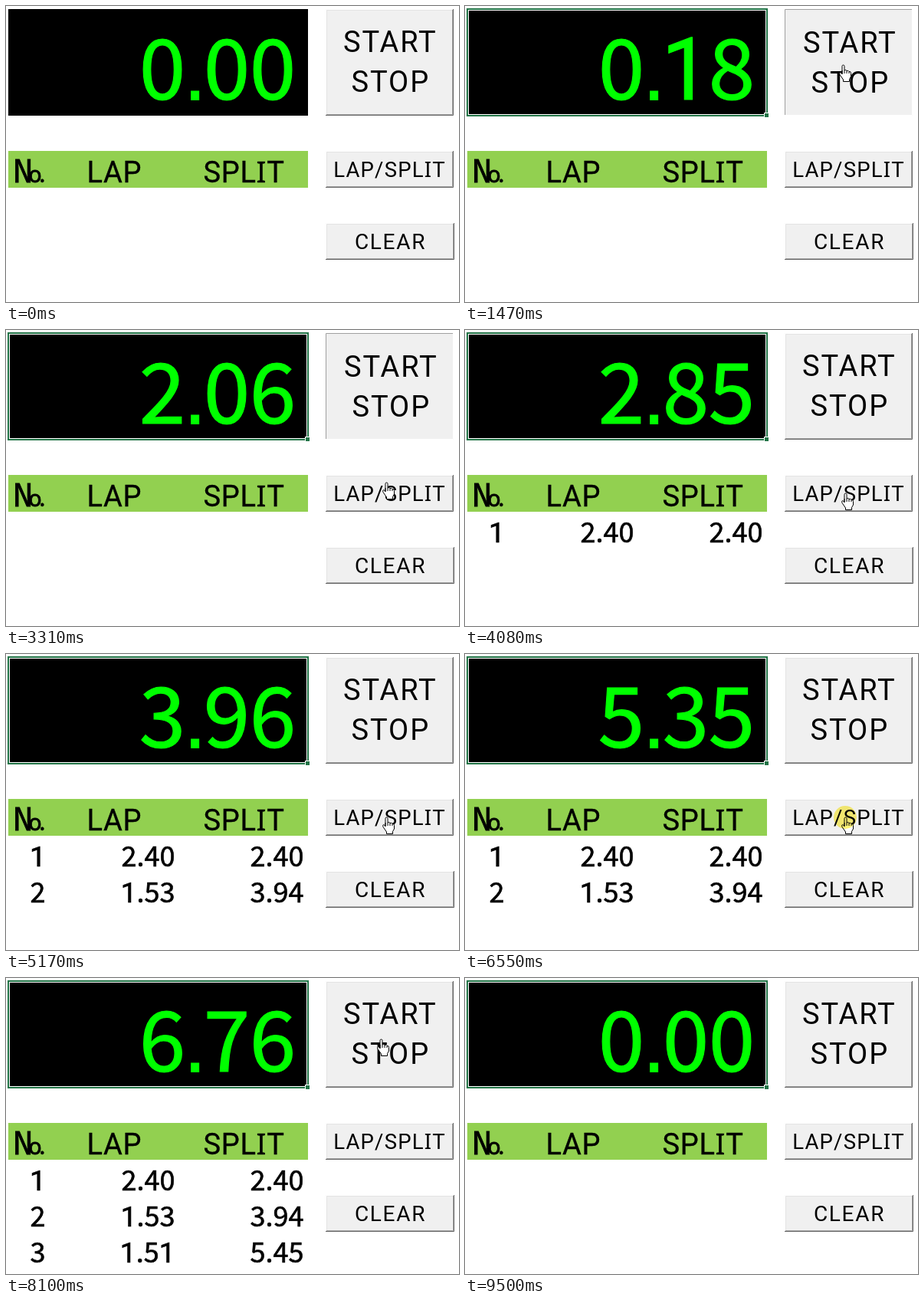
These frames come from a looping animation (591x386 px, 9930 ms). An HTML page:

```html
<!DOCTYPE html>
<html lang="en">
<head>
<meta charset="utf-8">
<title>Stopwatch</title>
<style>
  html, body { margin: 0; width: 100%; height: 100%; overflow: hidden; background: #fff; }
  svg { display: block; font-family: Roboto, "Liberation Sans", sans-serif; }
  .big, .row { font-family: "Noto Sans CJK JP", "Noto Sans CJK SC", "Noto Sans CJK", Roboto, sans-serif; }
  .big { font-size: 109px; fill: #0f0; stroke: #0f0; stroke-width: 1.2; text-anchor: middle; }
  .dot { font: 116px "Liberation Sans", sans-serif; fill: #0f0; text-anchor: middle; }
  .head { font-size: 38px; letter-spacing: .7px; stroke: #000; stroke-width: .3; }
  .row { font-size: 36px; text-anchor: end; stroke: #000; stroke-width: .6; }
  .mid { text-anchor: middle; }
  .no { font-family: "Noto Sans Mono", monospace; stroke: #000; stroke-width: .8; }
  .label { text-anchor: middle; }
  .serif { font-family: "Noto Sans", sans-serif; }
  .one { font-family: Roboto, sans-serif; font-size: 1.03em; }
</style>
</head>
<body>
<svg id="stage" width="591" height="386" viewBox="0 0 591 386">
  <rect x="3" y="4" width="391" height="139"/>
  <g id="selection" fill="none">
    <rect x="3" y="4" width="391" height="139" stroke="#217346" stroke-width="2"/>
    <rect x="4.5" y="5.5" width="388" height="136" stroke="#fff"/>
    <rect x="390" y="139" width="7" height="7" fill="#fff"/>
    <rect x="391" y="140" width="5" height="5" fill="#217346"/>
  </g>
  <text class="big" id="ones" x="204" y="122"></text>
  <text class="dot" x="246.5" y="123">.</text>
  <text class="big" id="tenths" x="288" y="122"></text>
  <text class="big" id="cents" x="348" y="122"></text>

  <rect x="3" y="189" width="391" height="48" fill="#92d050"/>
  <text class="no" y="230"><tspan x="9.5" font-size="42">N</tspan><tspan x="29.3" font-size="29">o</tspan></text>
  <text class="head" x="42.5" y="230">.</text>
  <text class="head" x="105.5" y="230">LAP</text>
  <text class="head" x="257.5" y="230">SPL<tspan class="serif">I</tspan>T</text>
  <g id="rows"></g>
  <g id="buttons"></g>
  <g id="hand" stroke="#000" stroke-width="1" stroke-linejoin="round">
    <path fill="#fff" d="M-2 1.5Q-2 0-.5 0Q1 0 1 1.5V7Q3 5.5 4 7.5Q6 6.5 7 8.5Q9.5 8 9.5 10.5V15L7.5 18.5V21.5H-.5V19L-5 12.5Q-6 9.5-4.2 9.5L-2 11.5Z"/>
    <path fill="none" d="M-2 7V12M1 7V11M4 7.5V11M7 8.5V11"/>
  </g>
  <circle id="glow" r="15" fill="#ffee2e" opacity=".66" style="mix-blend-mode:multiply"/>
</svg>
<script>
const LOOP = 9930, START = 1300, TICK = 77.1, LAST_TICK = 86, RESET = 9040;
const $ = id => document.getElementById(id);
const at = tick => START + tick * TICK;

// [tick, seconds shown]
const clock = [[0, .02], [15, 1.2], [36, 2.85], [50, 3.96], [68, 5.35], [77, 6.05], [86, 6.76]];

const laps = [
  { tick: 31, lap: "2.40", split: "2.40" },
  { tick: 50, lap: "1.53", split: "3.94" },
  { tick: 70, lap: "1.51", split: "5.45" }
];

// Pointer moves along quadratic curves
const outQuad = p => 1 - (1 - p) ** 2, smooth = p => p * p * (3 - 2 * p), linear = p => p;
const moves = [
  { from: 70, to: 610, steps: 8, ease: outQuad, path: [[575, 420], [530, 240], [494, 77]] },
  { from: 2700, to: 3390, steps: 10, ease: smooth, path: [[494, 77], [498, 145], [497, 213]] },
  { from: 6710, to: 7400, steps: 10, ease: smooth, path: [[497, 213], [494, 146], [490, 80]] },
  { from: 8250, to: 8570, steps: 5, ease: smooth, path: [[490, 80], [462, 220], [482, 303]] },
  { from: 9360, to: 9500, steps: 3, ease: linear, path: [[482, 303], [496, 345], [506, 400]] }
];

const glows = [[840, 1330], ...laps.map(l => [at(l.tick - 2), at(l.tick)]), [7480, 8100], [8890, RESET]];

const buttons = [
  { box: [417, 4, 167, 139], size: 38, space: 1.9, lines: [["START", 501.3, 60.3], ["STOP", 501.8, 112.3]],
    down: [[920, at(30)], [7790, 8100]] },
  { box: [417, 189, 167, 48], size: 27.5, space: 1.2, lines: [["LAP/SPLIT", 500.5, 222.5]],
    down: laps.map(l => [at(l.tick - 1), at(l.tick)]) },
  { box: [417, 283, 168, 48], size: 28, space: 1.7, lines: [["CLEAR", 501.5, 316.8]],
    down: [[8970, RESET]] }
];

// Capital I takes serifs, 1 goes without a foot
const glyphs = s => s.replace(/[I1]/g, c => `<tspan class="${c === "1" ? "one" : "serif"}">${c}</tspan>`);

function edge(x, y, w, h, light, dark) {
  return `<path fill="none" stroke="${light}" d="M${x + .5} ${y + h}V${y + .5}H${x + w}"/>
    <path fill="none" stroke="${dark}" d="M${x} ${y + h - .5}H${x + w - .5}V${y}"/>`;
}

function buildButton(b) {
  const [x, y, w, h] = b.box;
  const text = b.lines.map(([s, cx, by]) => `<text x="${cx}" y="${by}">${glyphs(s)}</text>`).join("");
  return `<g><rect x="${x}" y="${y}" width="${w}" height="${h}" fill="#f0f0f0"/>
    <g class="up">${edge(x + 1, y + 1, w - 2, h - 2, "#e3e3e3", "#a0a0a0")}${edge(x, y, w, h, "#fff", "#696969")}</g>
    <g class="down">${edge(x, y, w, h, "#a0a0a0", "#fff")}</g>
    <g class="label" font-size="${b.size}" letter-spacing="${b.space}">${text}</g></g>`;
}

$("buttons").innerHTML = buttons.map(buildButton).join("");
$("rows").innerHTML = laps.map((l, i) => {
  const y = 277 + 47 * i;
  return `<g><text class="row mid" x="41.5" y="${y}">${glyphs(String(i + 1))}</text>
    <text class="row" x="220.5" y="${y}">${glyphs(l.lap)}</text>
    <text class="row" x="388.5" y="${y}">${glyphs(l.split)}</text></g>`;
}).join("");

const show = (el, on) => el.setAttribute("visibility", on ? "visible" : "hidden");
const within = (t, spans) => spans.some(([a, b]) => t >= a && t < b);

function seconds(t) {
  if (t < START || t >= RESET) return 0;
  const n = Math.min(LAST_TICK, Math.floor((t - START) / TICK));
  const i = Math.max(1, clock.findIndex(k => k[0] >= n));
  const [a, u] = clock[i - 1], [b, v] = clock[i];
  return u + (v - u) * (n - a) / (b - a);
}

function pointer(t) {
  const m = moves.filter(m => t >= m.from).pop();
  if (!m) return [600, 420];
  const k = Math.floor((t - m.from) / (m.to - m.from) * (m.steps - 1) + 1e-6) + 1;
  const p = m.ease(Math.min(1, k / m.steps)), q = 1 - p;
  const [a, via, b] = m.path;
  return [0, 1].map(i => q * q * a[i] + 2 * p * q * via[i] + p * p * b[i]);
}

function draw(t) {
  const s = seconds(t).toFixed(2);
  $("ones").innerHTML = glyphs(s[0]);
  $("tenths").innerHTML = glyphs(s[2]);
  $("cents").innerHTML = glyphs(s[3]);
  show($("selection"), t >= 70);

  laps.forEach((l, i) => show($("rows").children[i], t >= at(l.tick) && t < RESET));
  buttons.forEach((b, i) => {
    const g = $("buttons").children[i], down = within(t, b.down);
    show(g.querySelector(".up"), !down);
    show(g.querySelector(".down"), down);
    g.querySelector(".label").setAttribute("transform", down ? "translate(1 1)" : "");
  });

  const [x, y] = pointer(t).map(Math.round);
  $("hand").setAttribute("transform", `translate(${x} ${y})`);
  $("glow").setAttribute("cx", x - 1);
  $("glow").setAttribute("cy", y);
  show($("glow"), within(t, glows));
}

const origin = performance.now();
function frame() {
  draw((performance.now() - origin) % LOOP);
  requestAnimationFrame(frame);
}
draw(0);
requestAnimationFrame(frame);
</script>
</body>
</html>
```
